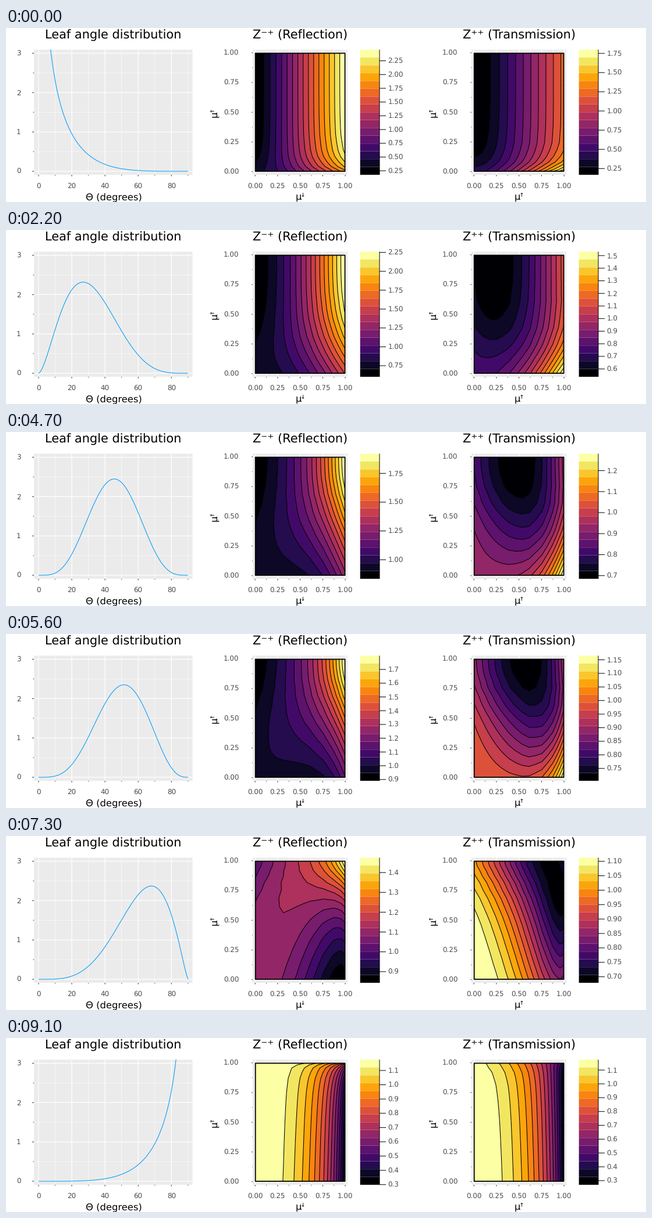
These frames come from a looping animation (1100x300 px, 9.2 s). A matplotlib script:

```python
import math

import numpy as np
import matplotlib.pyplot as plt
from matplotlib.animation import FuncAnimation
from matplotlib.patches import Rectangle

W, H, DPI = 1100, 300, 100
TOP, BOTTOM = 37.4, 253.1
INK, GRAY = "black", "#4d4d4d"
TITLE, GUIDE, TICK = 20.83, 16.37, 11.9    # text sizes in pixels
R, T = 0.4, 0.2                            # leaf reflectance, transmittance
BANDS = 16

plt.rcParams.update({"font.family": "DejaVu Sans", "text.hinting": "none",
                     "path.snap": False})
fig = plt.figure(figsize=(W / DPI, H / DPI), dpi=DPI, facecolor="white")
ax = fig.add_axes([0, 0, 1, 1])
ax.set_xlim(0, W)
ax.set_ylim(H, 0)
ax.axis("off")


def pt(px):
    return px * 72 / DPI


def text(x, y, s, size, color=INK, **kw):
    return ax.text(x, y, s, fontsize=pt(size), color=color, va="baseline", **kw)


def line(xs, ys, width, color=INK, **kw):
    return ax.plot(xs, ys, color=color, lw=pt(width),
                   solid_capstyle="butt", **kw)[0]


class Panel:
    """Plot area whose data limits are widened by 3 % on every side."""

    def __init__(self, left, right, xlim, ylim):
        self.left, self.right = left, right
        self.xlim, self.ylim = xlim, ylim

    @staticmethod
    def scale(v, lim, a, b):
        pad = 0.03 * (lim[1] - lim[0])
        return a + (v - lim[0] + pad) / (lim[1] - lim[0] + 2 * pad) * (b - a)

    def px(self, v):
        return self.scale(v, self.xlim, self.left, self.right)

    def py(self, v):
        return self.scale(v, self.ylim, BOTTOM, TOP)

    def grid_x(self, v, major):
        x, tick = self.px(v), 0.012 if major else 0.006
        line([x, x], [TOP, BOTTOM], 1.3 if major else 0.6, "white", zorder=1)
        line([x, x], [BOTTOM, BOTTOM + tick * (BOTTOM - TOP)], 1, "#333333")

    def grid_y(self, v, major):
        y, tick = self.py(v), 0.012 if major else 0.006
        line([self.left, self.right], [y, y], 1.3 if major else 0.6,
             "white", zorder=1)
        line([self.left - tick * (self.right - self.left), self.left],
             [y, y], 1, "#333333")

    def decorate(self, xticks, yticks, fmt, label_x, title, xlabel):
        self.area = Rectangle((self.left, TOP), self.right - self.left,
                              BOTTOM - TOP, fc="#ebebeb", lw=0, zorder=0)
        ax.add_patch(self.area)
        for ticks, lim, draw in ((xticks, self.xlim, self.grid_x),
                                 (yticks, self.ylim, self.grid_y)):
            minors = ticks + (ticks[1] - ticks[0]) / 2
            for v in minors[minors <= lim[1]]:
                draw(v, False)
            for v in ticks:
                draw(v, True)
        for v in xticks:
            text(self.px(v), 277.2, format(v, fmt), TICK, GRAY, ha="center")
        for v in yticks:
            text(label_x, self.py(v) + 4.3, format(v, fmt), TICK, GRAY,
                 ha="right")
        mid = (self.left + self.right) / 2
        text(mid, 18.3, title, TITLE, ha="center")
        text(mid + 0.5, 297, xlabel, GUIDE, ha="center")


def unit_nodes(n):
    x, w = np.polynomial.legendre.leggauss(n)
    return (x + 1) / 2, w / 2


def beta_pdf(x, a, b):
    norm = math.exp(math.lgamma(a + b) - math.lgamma(a) - math.lgamma(b))
    with np.errstate(divide="ignore"):
        return norm * x ** (a - 1) * (1 - x) ** (b - 1)


def projection(mu, leaf):
    """Azimuth mean of the lit leaf side, rows: leaf angle, columns: mu."""
    ml = np.cos(leaf * np.pi / 2)[:, None]
    cc = mu * ml
    ss = np.sqrt(1 - mu ** 2) * np.sqrt(1 - ml ** 2)
    phi = np.arccos(np.clip(-cc / ss, -1, 1))
    return (cc * phi + ss * np.sin(phi)) / np.pi


MU, _ = unit_nodes(20)
LEAF, LEAF_W = unit_nodes(10)
UP, DOWN = projection(MU, LEAF), projection(-MU, LEAF)
ROSS, ROSS_W = unit_nodes(20)
ROSS_A = projection(MU, ROSS) + projection(-MU, ROSS)


def scattering(a, b):
    f = (beta_pdf(LEAF, a, b) * LEAF_W)[:, None]
    same = (f * UP).T @ UP + (f * DOWN).T @ DOWN
    cross = (f * UP).T @ DOWN + (f * DOWN).T @ UP
    ross = (beta_pdf(ROSS, a, b) * ROSS_W) @ ROSS_A
    g = ross[:, None] * (R + T) / 4
    return (T * cross + R * same) / g, (R * cross + T * same) / g


COLORS = plt.get_cmap("inferno")(np.linspace(0, 1, BANDS))
SPAN = (MU[0], MU[-1])
quarter = np.arange(0, 1.01, 0.25)

curve_panel = Panel(48.2, 320.6, (0, 90), (0, 3))
curve_panel.decorate(np.arange(0, 81, 20), np.arange(0, 4), ".0f", 25.3,
                     "Leaf angle distribution", "Θ (degrees)")

maps = []
for left, title, xlabel in ((424.1, "Z⁻⁺ (Reflection)", "μꜜ"),
                            (800.1, "Z⁺⁺ (Transmission)", "μꜛ")):
    p = Panel(left, left + 163.1, SPAN, SPAN)
    p.decorate(quarter, quarter, ".2f", left - 23.8, title, xlabel)
    text(left - 60.4, 153.5, "μꜛ", GUIDE, rotation=90,
         rotation_mode="anchor", ha="left")
    x0, x1, y0, y1 = p.px(SPAN[0]), p.px(SPAN[1]), p.py(SPAN[0]), p.py(SPAN[1])
    ax.add_patch(Rectangle((x0, y1), x1 - x0, y0 - y1, fill=False,
                           ec=INK, lw=pt(1.8), zorder=5))
    bar = left + 184.6
    p.edge = bar + 33.3
    step = (BOTTOM - TOP) / BANDS
    for k, c in enumerate(COLORS):
        ax.add_patch(Rectangle((bar, BOTTOM - (k + 1) * step), p.edge - bar,
                               step, fc=c, lw=0))
    line([p.edge] * 2, [TOP, BOTTOM], 1)
    maps.append(p)

X = np.linspace(0, 1, 101)
curve = line([], [], 1.05, "#009afa", zorder=4)
curve.set_clip_path(curve_panel.area)

STEPS = np.round(np.arange(0.5, 5.01, 0.1), 1)
ALPHA = np.append(STEPS, np.full(len(STEPS), 5.0))
BETA = ALPHA[::-1]
moving = []


def tick_step(span):
    n = math.floor(math.log10(span))
    lead = span / 10 ** n
    unit = 2 if lead > 5 else 1 if lead > 2.5 else 0.5 if lead > 1 else 0.2
    return unit * 10 ** n / 2


def decimals(step):
    return next(d for d in range(1, 6)
                if abs(step * 10 ** d - round(step * 10 ** d)) < 1e-6)


def draw_map(p, z):
    lo, hi = z.min(), z.max()
    levels = np.linspace(lo, hi, BANDS + 1)
    xs, ys = p.px(MU), p.py(MU)
    moving.append(ax.contourf(xs, ys, z, levels, colors=COLORS, zorder=2))
    moving.append(ax.contour(xs, ys, z, levels[1:-1], colors=INK,
                             linewidths=pt(1.05), zorder=3))
    step = tick_step(hi - lo)
    digits = decimals(step)
    first, last = math.ceil(lo / step - 1e-9), math.floor(hi / step + 1e-9)
    for k in range(first, last + 1):
        y = BOTTOM - (k * step - lo) / (hi - lo) * (BOTTOM - TOP)
        moving.append(line([p.edge, p.edge + 11], [y, y], 1))
        moving.append(text(p.edge + 14.6, y + 4.3, f"{k * step:.{digits}f}",
                           TICK, GRAY))


def update(i):
    while moving:
        moving.pop().remove()
    a, b = ALPHA[i], BETA[i]
    pdf = beta_pdf(X, a, b)
    ok = np.isfinite(pdf)
    curve.set_data(curve_panel.px(90 * X[ok]), curve_panel.py(pdf[ok]))
    for p, z in zip(maps, scattering(a, b)):
        draw_map(p, z)
    # contour calls may rescale the stage
    ax.set_xlim(0, W)
    ax.set_ylim(H, 0)
    return []


anim = FuncAnimation(fig, update, frames=len(ALPHA), interval=100,
                     init_func=lambda: [], repeat=True, repeat_delay=0)
plt.show()
```
